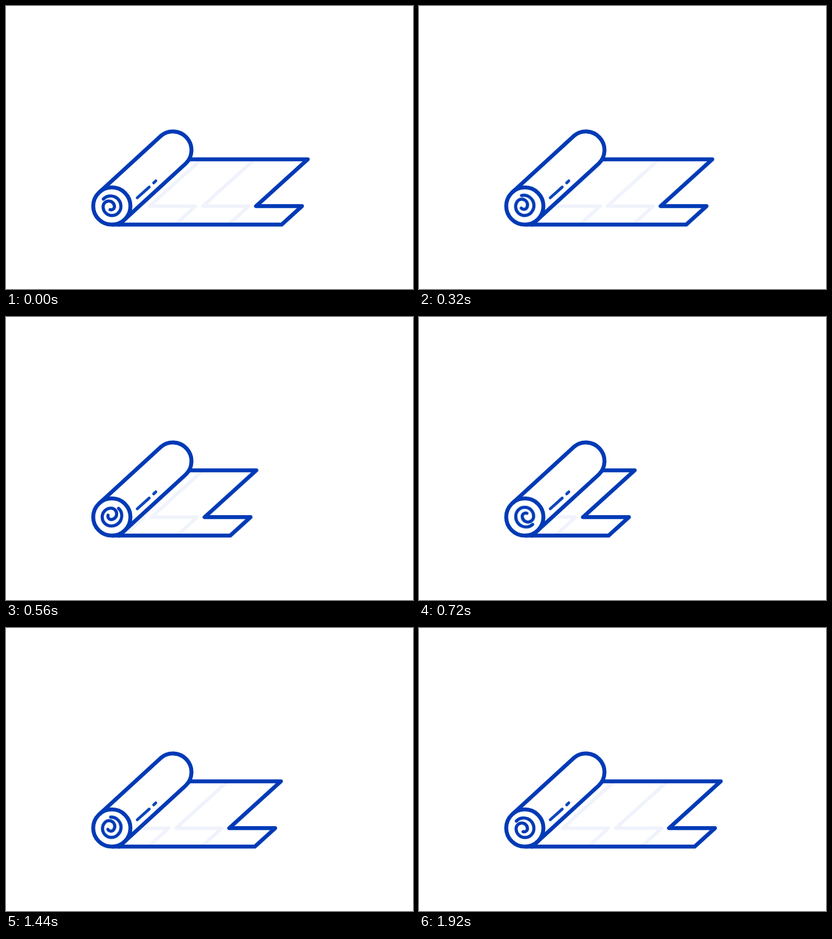
Animation, 700 px wide and 487 px high, one loop 2400 ms. Source, as an HTML page:

```html
<!DOCTYPE html>
<html lang="en">
<head>
<meta charset="utf-8">
<title>Vinyl roll</title>
<style>
  html, body {
    margin: 0;
    width: 100%;
    height: 100%;
    overflow: hidden;
    background: #fff;
  }
  svg {
    display: block;
    width: 100%;
    height: 100%;
  }
  path, circle {
    fill: none;
    stroke: #003ab6;
    stroke-width: 6.8;
    stroke-linecap: round;
    stroke-linejoin: round;
  }
  .body { fill: #fff; }
  .pattern { stroke: #f0f3fb; stroke-width: 6; }
  .shine { stroke: #0e46bc; stroke-width: 5; }
  .spiral {
    stroke-width: 5.4;
    transform-origin: 182px 344px;
    animation: wind 2400ms infinite;
  }
  .sheet { animation: pull 2400ms infinite; }

  /* 0-720 ms roll up, hold until 1200 ms, unroll until 1920 ms */
  @keyframes pull {
    0% { transform: translateX(0); animation-timing-function: cubic-bezier(1, 0, .667, 1); }
    30% { transform: translateX(-148px); }
    50% { transform: translateX(-148px); animation-timing-function: cubic-bezier(.333, 0, 0, 1); }
    80%, 100% { transform: translateX(0); }
  }
  @keyframes wind {
    0% { transform: rotate(0deg); animation-timing-function: cubic-bezier(.3, 0, 1, .5); }
    30% { transform: rotate(185deg); }
    50% { transform: rotate(185deg); animation-timing-function: cubic-bezier(.1, .1, .05, 1); }
    80%, 100% { transform: rotate(0deg); }
  }
</style>
</head>
<body>
<svg viewBox="0 0 700 487">
  <defs>
    <clipPath id="ahead">
      <path d="M182 385V344L295 240H540V385Z"/>
    </clipPath>
    <path id="chevron" class="pattern" d="M519 263.8L430 344.4H509L474 376.2"/>
  </defs>

  <g clip-path="url(#ahead)">
    <g class="sheet">
      <use href="#chevron" x="-91.5"/>
      <use href="#chevron" x="-183"/>
      <path d="M100 263.8H519L430 344.4H509L474 376.2H100"/>
    </g>
  </g>

  <path class="body" d="M160.4 320.7L265.9 223.9A32 32 0 0 1 309.1 271.1L194.7 376.1H182Z" style="stroke: none"/>
  <path d="M160.4 320.7L265.9 223.9A32 32 0 0 1 309.1 271.1L194.7 376.1"/>
  <circle class="body" cx="182" cy="344.2" r="32"/>

  <path class="shine" d="M225.8 330L246.3 311.6M254 304.3L257.6 301"/>
  <path class="spiral" d="M167.5 332.2A17.5 17.5 0 0 1 197.6 344.6A15.3 15.3 0 0 1 167 345.8A9.8 9.8 0 0 1 186.6 345A5.9 5.9 0 0 1 179 350.5"/>
</svg>
</body>
</html>
```
